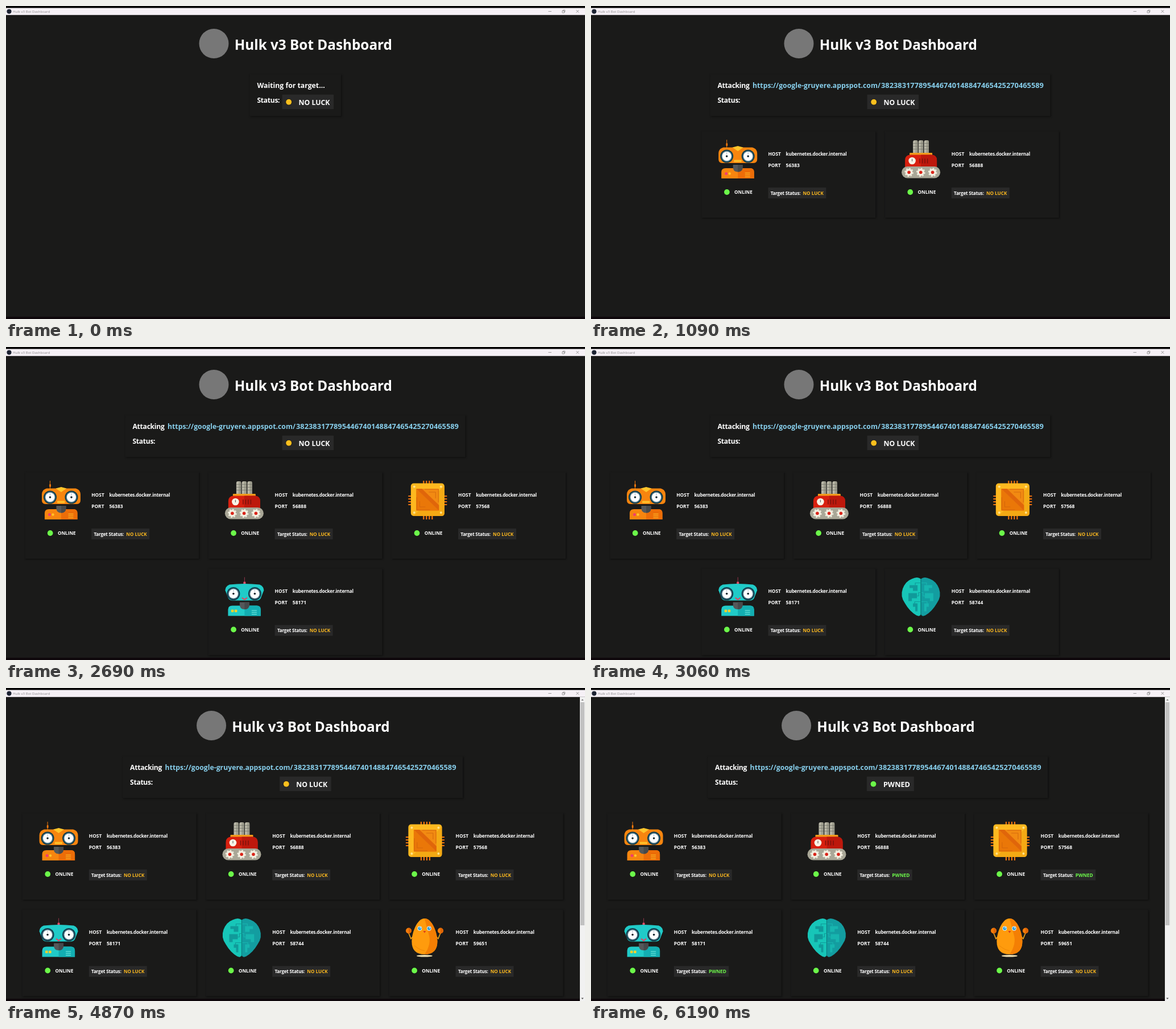
An HTML page that plays this animation: 1018 px wide and 550 px high, repeating every 6.85 s.

```html
<!DOCTYPE html>
<html lang="en">
<head>
<meta charset="utf-8">
<title>Bot Dashboard</title>
<style>
  html, body { margin: 0; height: 100%; overflow: hidden; background: #1a1a19; }
  svg { display: block; width: 100vw; height: 100vh; }
  text { font-family: "Open Sans", "Noto Sans", sans-serif; font-weight: 700; fill: #fff; }
  .panel { fill: #1a1a19; filter: drop-shadow(1.5px 1.5px 1.5px #0c0c0c); }
  .badge { fill: #292929; }
  .tight { letter-spacing: -.025em; }
</style>
</head>
<body>
<svg id="stage" viewBox="0 0 1018 550"></svg>
<script>
const LOOP = 6850;
const STEPS = [0, 490, 600, 1090, 1970, 2690, 3060, 4320, 4870, 5530, 6190];
const BOT_COUNT = [0, 0, 1, 2, 3, 4, 5, 6, 6, 6, 6];
const ATTACK = 1, SCROLLBAR = 8, FIRST_HIT = 9;
const AMBER = '#fdb91e', GREEN = '#6cf84a';

const rect = (x, y, w, h, fill, r = 0) =>
  `<rect x="${x}" y="${y}" width="${w}" height="${h}" rx="${r}" fill="${fill}"/>`;
const box = (x, y, w, h, name) =>
  `<rect x="${x}" y="${y}" width="${w}" height="${h}" class="${name}"/>`;
const dot = (x, y, r, fill) => `<circle cx="${x}" cy="${y}" r="${r}" fill="${fill}"/>`;
const shape = (d, fill) => `<path d="${d}" fill="${fill}"/>`;
const line = (d, color, width = 1) =>
  `<path d="${d}" fill="none" stroke="${color}" stroke-width="${width}"/>`;
const text = (x, y, size, str, attrs = '') =>
  `<text x="${x}" y="${y}" font-size="${size}" ${attrs}>${str}</text>`;
const color = c => `style="fill:${c}"`;
const TIGHT = 'class="tight"';
const group = (x, y, content) => `<g transform="translate(${x} ${y})">${content}</g>`;
const lamp = (x, y, r, fill) => dot(x, y, r + .5, '#10100f') + dot(x, y, r, fill);

// Icons, each on a 68 x 68 area
const eye = x => dot(x, 29, 11.5, '#123c4c') + dot(x, 29, 9.4, '#5f8796') +
  dot(x, 29, 8, '#fff') + dot(x, 29, 1.8, '#10242c') + line(`M${x} 22v4`, '#9ab', .8);

const robotBase = (head, main, dark, trim) =>
  shape('M5.5 68V57Q5.5 50 13 50H56Q63 50 63 57V68Z', main) +
  shape('M34.5 50H56Q63 50 63 57V68H34.5Z', dark) +
  shape('M26 44H43V48Q43 56.5 34.5 56.5T26 48Z', '#55585a') +
  shape('M34.5 44H43V48Q43 56.5 34.5 56.5Z', '#46494b') +
  shape(head, main) + eye(15) + eye(52.5) +
  line('M47 58.5h9M47 61.8h9M47 65h9', trim, 1.1);

const orangeRobot = () =>
  line('M15 0V14', '#f0780c', 1) + rect(13.7, 6, 2.8, 5, '#f0780c', 1) +
  robotBase('M9 13.5H60Q68.5 16 68.5 24V34Q68.5 41 62 41H7Q.5 41 .5 34V24Q.5 16 9 13.5Z',
    '#f7850f', '#ec6d08', '#ffc52b') +
  shape('M25 13.5L34.5 11L44 13.5L34.5 20Z', '#ffc52b') +
  rect(27.5, 35.5, 13.5, 3.8, '#ffc02a', 1) +
  dot(14, 59.5, 2.5, '#ef3e72') + dot(20, 59.5, 2.2, '#ffc52b');

const tealRobot = () =>
  line('M34.5 0V20', '#97364c', 1) + rect(32.5, 8, 4, 9, '#e0506a', 1) +
  robotBase('M8 13Q34 10 61 13Q68 16 68.5 23L63 37Q61 41 55 41H14Q8 41 6 37L.5 23Q1 16 8 13Z',
    '#20cbc8', '#13aeb2', '#7df0e4') +
  line('M30 36L34.5 39.5L39 36', '#e8405f', 2) +
  rect(11, 57, 4.5, 4.5, '#f6d32d', 1) + rect(17, 57, 4.5, 4.5, '#f6d32d', 1);

const pipe = x => rect(x, 1, 8.3, 24, '#b8b6a6', 3) + rect(x + 4.2, 1, 4.1, 24, '#9c9b8c', 2) +
  line(`M${x} 6.5h8.3M${x} 11.5h8.3M${x} 16.5h8.3`, '#77786c', .8);
const wheel = x => dot(x, 57.2, 6.2, '#f3efe0') +
  `<circle cx="${x}" cy="57.2" r="6.9" fill="none" stroke="#f3efe0" stroke-width="1.8" stroke-dasharray="2.7"/>` +
  dot(x, 57.2, 2.8, '#d9251a');

const engine = () =>
  [20, 29.7, 39.4].map(pipe).join('') + rect(14, 23, 40, 5, '#f29a1c', 1) +
  shape('M6 48V36Q6 26.5 16 26.5H52Q62 26.5 62 36V48Z', '#d8200f') +
  shape('M34 26.5H52Q62 26.5 62 36V48H34Z', '#bd180c') +
  dot(18.5, 37, 6.3, '#f7f3e6') + line('M18.5 33.5V38', '#555', 1) +
  line('M32 33v8.5M36.5 33v8.5M41 33v8.5M45.5 33v8.5', '#7b120c', 1.5) +
  rect(0, 47, 68, 20.5, '#a9a797', 10.2) + [13, 33.7, 54.5].map(wheel).join('');

const chip = () =>
  line('M27 0V68M32 0V68M37 0V68M42 0V68M0 27H68M0 32H68M0 37H68M0 42H68', '#f0740e', 2.2) +
  rect(4.5, 4.5, 59, 57.5, '#fdb81f', 5) + shape('M63.5 9V57Q63.5 62 58.5 62H9Z', '#f4a914') +
  rect(14, 14, 40, 38.5, '#f28a12') + shape('M14 14V52.5H54Z', '#ea7708') +
  shape('M14 14H24L54 43V52.5Z', '#e0660a') +
  line('M29 15H53V38M36 20H48V31M15 29V51H38M20 36V46H30', '#c9600c', .7) +
  [[10.5, 10.5], [57.5, 10.5], [10.5, 56], [57.5, 56]].map(([x, y]) => dot(x, y, 2, '#ffe38a')).join('');

const brain = () => {
  const half = (main, detail) =>
    shape('M33.7 3Q28 -2 18 3Q7 7 2 20Q-3 34 6 46Q14 60 26 67Q32 70 33.7 65Z', main) +
    shape('M14 14H28V24H20V19H14ZM12 28H27V37H18V42H12ZM20 46H28V60H24V52H20Z', detail) +
    line('M33 10H24V14M33 27H30V33H26M33 43H23V47', detail, 1.2);
  return half('#17c6b8', '#109a9a') +
    `<g transform="matrix(-1 0 0 1 67.8 0)">${half('#139da0', '#17b5af')}</g>` +
    line('M33.9 3V67', '#0b8688', .8);
};

const fist = x => dot(x, 22, 5, '#f57c0b') + shape(`M${x} 17a5 5 0 0 1 0 10Z`, '#de6506');
const eggEye = x => dot(x, 18, 3.9, '#e8f5fc') + dot(x, 18, 3, '#2b9bd6') + dot(x + .8, 17, 1.1, '#fff');
const eggBot = () =>
  '<ellipse cx="33" cy="66.3" rx="14" ry="1.8" fill="#f2e2b4"/>' +
  line('M5 26L9 36L13 32V40M61 26L57 36L53 32V40', '#f3a51b', 1.6) +
  shape('M33 .5C46 .5 55.5 25 55.5 41Q55.5 63.5 33 63.5T10.5 41C10.5 25 20 .5 33 .5Z', '#ff9b0d') +
  shape('M33 .5C46 .5 55.5 25 55.5 41Q55.5 63.5 33 63.5Q46 45 40 27Z', '#f47f04') +
  eggEye(24.5) + eggEye(41) + shape('M30.5 22.5H35.5L33 26Z', '#d93a1c') +
  line('M15 48Q24 56 33 57', '#e98206', .8) + fist(5) + fist(61);

const BOTS = [
  { icon: orangeRobot, port: 56383 },
  { icon: engine, port: 56888, hit: FIRST_HIT },
  { icon: chip, port: 57568, hit: 10 },
  { icon: tealRobot, port: 58171, hit: 10 },
  { icon: brain, port: 58744 },
  { icon: eggBot, port: 59651 },
];

function card({ icon, port, hit }, index, count, step) {
  const row = Math.floor(index / 3);
  const inRow = Math.min(3, count - row * 3);
  const x = 355.6 + (index % 3 - (inRow - 1) / 2) * 322.4;
  const pwned = step >= hit;
  return group(x, row * 169.5,
    box(0, 220, 306, 152, 'panel') + group(29.3, 235, icon()) +
    text(117, 262.8, 8.4, 'HOST') +
    text(148.2, 262.8, 8.2, 'kubernetes.docker.internal', TIGHT) +
    text(117, 282.5, 8.4, 'PORT') + text(148.2, 282.5, 8.5, port) +
    lamp(44.5, 327, 4.9, GREEN) + text(57.7, 330.2, 8.2, 'ONLINE') +
    box(117, 319, pwned ? 96.5 : 102, 19, 'badge') +
    text(121.3, 331.7, 8.1, 'Target Status:', TIGHT) +
    (pwned ? text(178.1, 331.7, 8.4, 'PWNED', color(GREEN))
           : text(178.1, 331.7, 8.15, 'NO LUCK', color(AMBER))));
}

function header(step) {
  const attacking = step >= ATTACK, pwned = step >= FIRST_HIT;
  const left = attacking ? 222.5 : 441.5;
  const badge = pwned ? 489.3 : 485.6;
  const sky = color('#87ceeb');
  return dot(365.5, 66, 26, '#777') +
    text(401.7, 77, 24.3, 'Hulk v3 Bot Dashboard') +
    box(left - 12.8, 120, attacking ? 598 : 160.5, 73.5, 'panel') +
    (attacking
      ? text(left, 144, 12.2, 'Attacking', TIGHT) +
        text(284, 144, 12.25, 'https://google-gruyere.appspot.com/', sky) +
        text(510, 144, 12.85, '382383177895446740148847465425270465589', sky)
      : text(left, 144, 12.25, 'Waiting for target...')) +
    text(left, 169.5, 12.1, 'Status:', TIGHT) +
    box(badge, 155.7, pwned ? 83 : 90.5, 25.5, 'badge') +
    lamp(badge + 11.6, 168.7, 5, pwned ? GREEN : '#fbbf1e') +
    text(badge + 29, 173.7, pwned ? 12.7 : 12.25, pwned ? 'PWNED' : 'NO LUCK');
}

const windowFrame = () =>
  rect(0, 0, 1018, 3.5, '#000') + rect(0, 3.5, 1018, 12.3, '#f6f1f6') + rect(0, 546, 1018, 4, '#0e070b') +
  dot(5.5, 9.6, 4.1, '#1d2433') +
  text(12, 12, 6.1, 'Hulk v3 Bot Dashboard', 'style="fill:#8b888b;font-weight:400"') +
  line('M953.5 9.5h5.5M978 8.5h3.5v3.5h-3.5zM979.3 8.3v-1.2h3.5v3.5h-1.2M1002.5 7l4.8 4.8M1007.3 7l-4.8 4.8', '#777', .7);

const scrollbar = () =>
  rect(1009, 16, 9, 534, '#f1f1f1') + rect(1010, 25, 7, 392, '#c1c1c1') +
  shape('M1011.3 22L1013.5 19.5L1015.7 22Z', '#777') + shape('M1011.3 544.5L1013.5 547L1015.7 544.5Z', '#555');

function render(step) {
  const count = BOT_COUNT[step], scrolled = step >= SCROLLBAR;
  const cards = BOTS.slice(0, count).map((bot, i) => card(bot, i, count, step)).join('');
  return rect(0, 0, 1018, 550, '#1a1a19') +
    group(scrolled ? -4.4 : 0, 0, header(step) + cards) +
    windowFrame() + (scrolled ? scrollbar() : '');
}

const stage = document.getElementById('stage');
let shown = -1;
function tick() {
  const time = performance.now() % LOOP;
  const step = STEPS.filter(start => start <= time).length - 1;
  if (step !== shown) stage.innerHTML = render(shown = step);
  requestAnimationFrame(tick);
}
tick();
</script>
</body>
</html>
```
